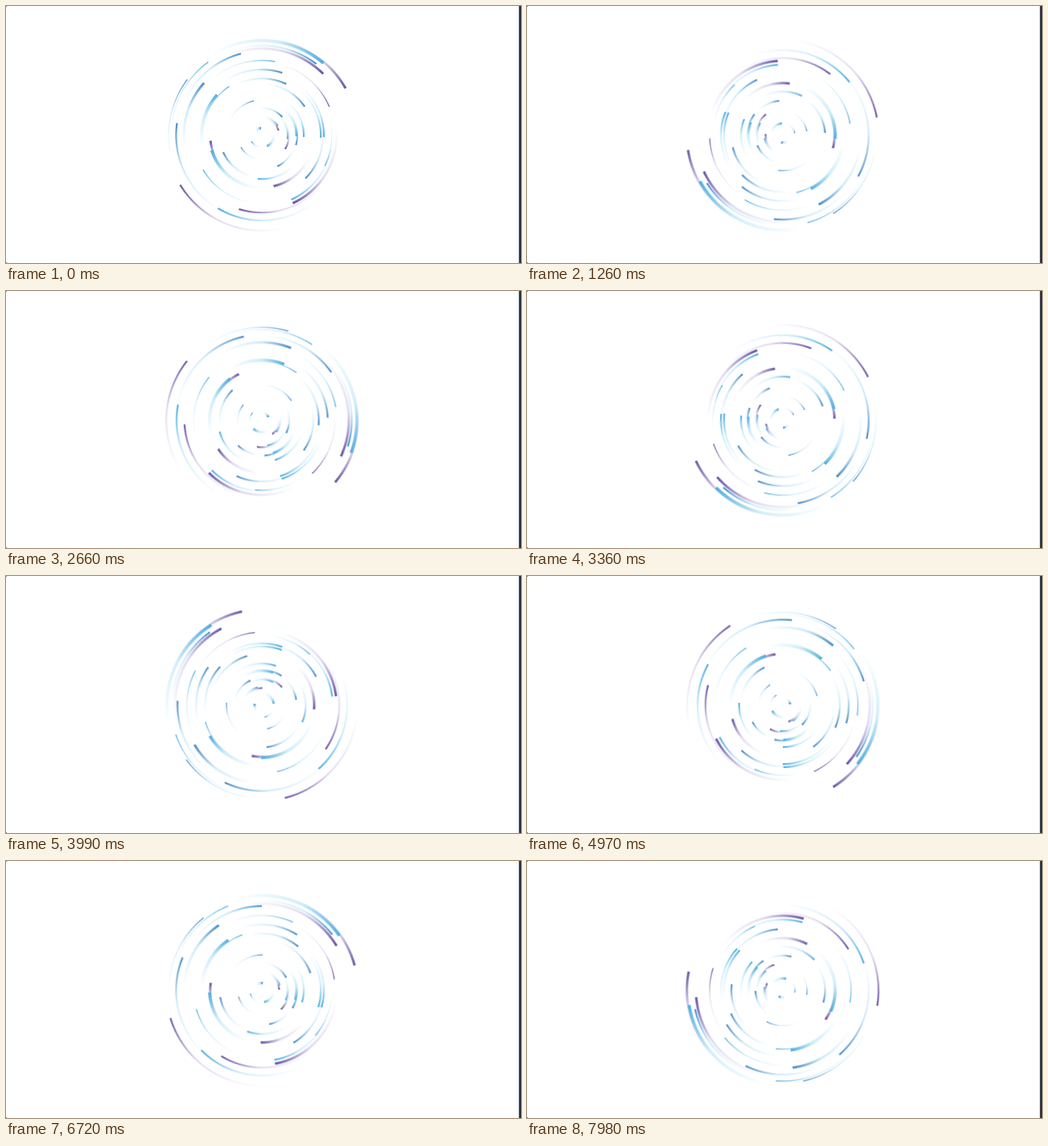
These frames come from a looping animation (640x320 px, 8000 ms). An HTML page without scripts:

```html
<!DOCTYPE html>
<html lang="en">
<head>
<meta charset="utf-8">
<title>Spinning arcs</title>
<style>
  html, body { margin: 0; width: 100%; height: 100%; overflow: hidden; background: #fff; }
  .stage { position: relative; width: 640px; height: 320px; overflow: hidden; background: #fff; }

  .edge { position: absolute; right: 0; top: 0; width: 3px; height: 100%;
    background: linear-gradient(90deg, #8d939c 0 1px, #141c2b 1px 2px, #2b3548 2px); }
  .corner { position: absolute; left: 0; width: 1px; height: 1px; background: #777; }

  .disc { position: absolute; left: 318px; top: 161px; width: 0; height: 0;
    animation: spin 8s infinite; }

  /* One short first step, then an even step every 70 ms. */
  @keyframes spin {
    0% { transform: rotate(0deg); animation-timing-function: step-end; }
    0.8625% { transform: rotate(5.66deg); animation-timing-function: steps(113, end); }
    99.7375% { transform: rotate(1300.6deg); animation-timing-function: step-end; }
    100% { transform: rotate(1300.6deg); }
  }

  /* --a: angle of the head, --r: radius, --l: length, --w: weight */
  .disc i {
    --l: 52deg; --w: 2.2px; --c: #4a8fca; --t: #8ccdf066;
    --in: calc(var(--r) - var(--w) / 2);
    --out: calc(var(--r) + var(--w) / 2);
    position: absolute;
    width: calc(2 * var(--r) + 8px);
    height: calc(2 * var(--r) + 8px);
    margin: calc(-1 * var(--r) - 4px);
    background: conic-gradient(from calc(var(--a) + 90deg - var(--l)),
      #0000 0deg, var(--t) calc(var(--l) * .58), var(--c) var(--l), #0000 calc(var(--l) + .5deg));
    -webkit-mask: var(--ring); mask: var(--ring);
    --ring: radial-gradient(circle,
      #0000 calc(var(--in) - .5px), #000 calc(var(--in) + .5px),
      #000 calc(var(--out) - .5px), #0000 calc(var(--out) + .5px));
  }
  .disc .p { --c: #6a57a6; --t: #b7a6d866; }
  .disc .c { --c: #52afe0; --t: #a0dcf680; }
  .disc .thin { --w: 1.3px; }
  .disc .wide { --w: 3px; }
  .disc .fat { --w: 3.8px; }
  .disc .long { --l: 70deg; }
  .disc .short { --l: 38deg; }
</style>
</head>
<body>
<div class="stage">
  <div class="disc">
    <!-- outer rings -->
    <i class="p wide" style="--a:-29.6deg;--r:119.3px"></i>
    <i class="c fat long" style="--a:-49.8deg;--r:118px"></i>
    <i class="p long" style="--a:148.5deg;--r:118.8px"></i>
    <i class="thin" style="--a:216.6deg;--r:115.8px"></i>
    <i class="c thin" style="--a:233.6deg;--r:113px"></i>
    <i style="--a:-53deg;--r:111.6px"></i>
    <i class="p wide long" style="--a:-45.4deg;--r:108px"></i>
    <i class="c long" style="--a:120.7deg;--r:106px"></i>
    <i class="long" style="--a:188deg;--r:106.6px"></i>
    <i style="--a:255.2deg;--r:105.5px"></i>

    <!-- middle rings -->
    <i class="wide" style="--a:222deg;--r:97px"></i>
    <i class="p long" style="--a:107deg;--r:96.2px"></i>
    <i class="c thin" style="--a:-80.1deg;--r:93.2px"></i>
    <i class="p wide long" style="--a:65.3deg;--r:92.8px"></i>
    <i class="p thin" style="--a:-23.2deg;--r:91px"></i>
    <i class="c" style="--a:65.2deg;--r:88px"></i>
    <i class="c thin short" style="--a:25.7deg;--r:87px"></i>
    <i class="c thin" style="--a:149.5deg;--r:84.7px"></i>
    <i style="--a:-72.2deg;--r:81.8px"></i>
    <i class="c" style="--a:1.5deg;--r:77px"></i>
    <i style="--a:44.5deg;--r:75.5px"></i>
    <i class="c fat" style="--a:221.8deg;--r:75px"></i>
    <i class="c" style="--a:2deg;--r:73.2px"></i>
    <i class="c thin" style="--a:236deg;--r:73.2px"></i>
    <i style="--a:-64.9deg;--r:70.7px"></i>

    <!-- inner rings -->
    <i class="p wide" style="--a:76.8deg;--r:65px"></i>
    <i class="p wide short" style="--a:173.8deg;--r:64.2px"></i>
    <i class="c fat long" style="--a:163deg;--r:65px"></i>
    <i style="--a:-34.2deg;--r:64px"></i>
    <i class="c" style="--a:95.3deg;--r:54.4px"></i>
    <i style="--a:156deg;--r:52.4px"></i>
    <i class="c" style="--a:2.2deg;--r:52px"></i>
    <i class="thin" style="--a:256.9deg;--r:44px"></i>
    <i style="--a:16deg;--r:44px"></i>
    <i class="c wide" style="--a:1deg;--r:42.5px"></i>
    <i class="short" style="--a:63.4deg;--r:42.5px"></i>
    <i style="--a:-42.6deg;--r:34px"></i>
    <i class="p" style="--a:30.4deg;--r:33.6px"></i>
    <i class="c" style="--a:8deg;--r:32px"></i>
    <i class="thin" style="--a:150deg;--r:30px"></i>
    <i class="c" style="--a:-30deg;--r:23px"></i>
    <i class="p" style="--a:-16.7deg;--r:21.4px"></i>
    <i class="thin" style="--a:149deg;--r:15px"></i>
    <i class="c wide long" style="--a:65deg;--r:14.8px"></i>
    <i class="wide" style="--a:-98deg;--r:9px"></i>
  </div>
  <div class="corner" style="top:0"></div>
  <div class="corner" style="bottom:0"></div>
  <div class="edge"></div>
</div>
</body>
</html>
```
